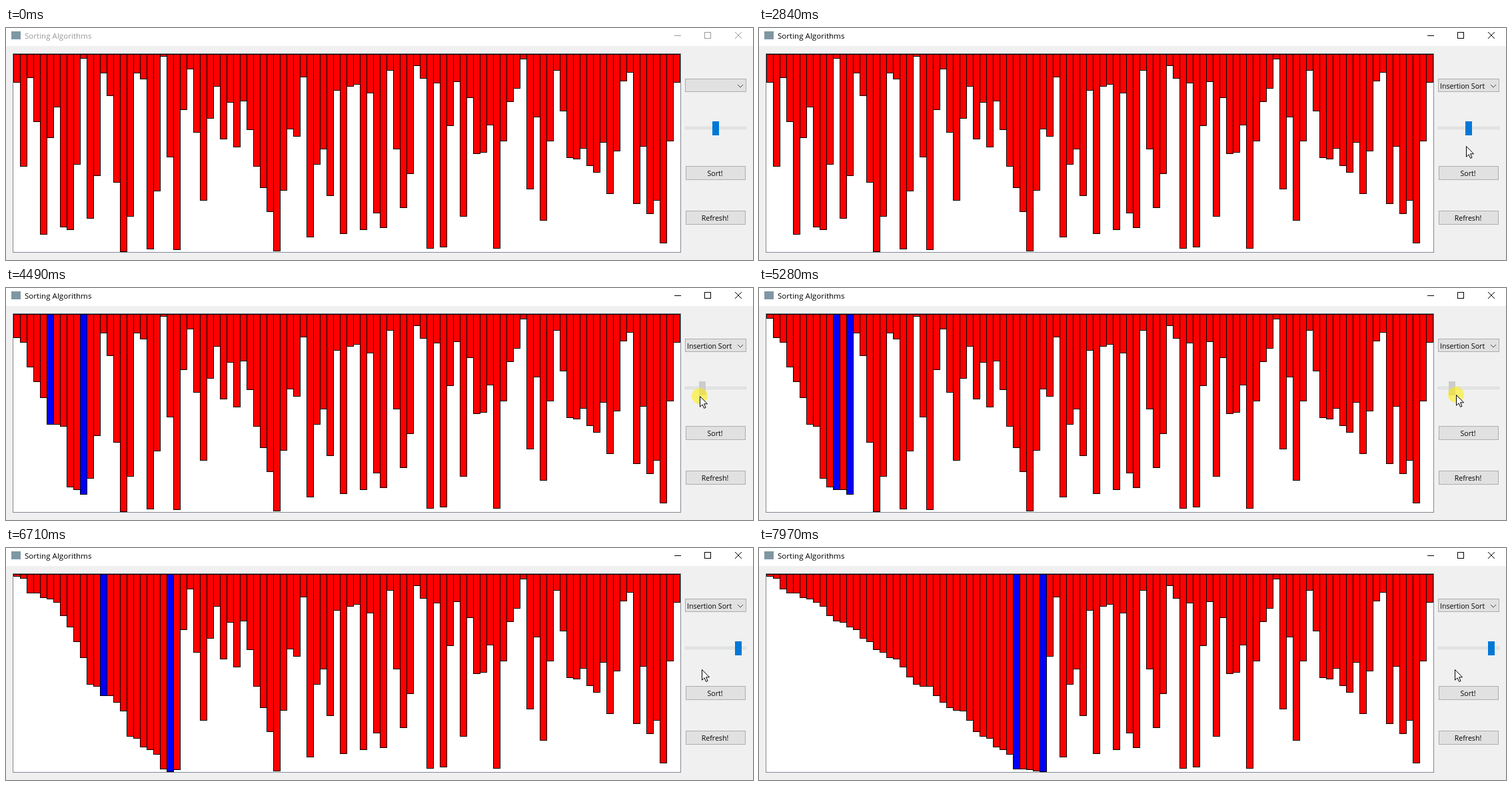
An HTML page with a canvas that plays this animation: 1121x348 px, repeating every 8 s.

```html
<!DOCTYPE html>
<html lang="en">
<head>
<meta charset="utf-8">
<title>Sorting Algorithms</title>
<style>
html, body { margin: 0; width: 100%; height: 100%; overflow: hidden; background: #f0f0f0; }
canvas, svg { position: absolute; left: 0; top: 0; width: 1121px; height: 348px; display: block; }
text { font: 500 10.6px "Open Sans", "Noto Sans", sans-serif; fill: #000; }
#title { font-size: 11.6px; }
.mid { text-anchor: middle; }
.crisp { shape-rendering: crispEdges; }
</style>
</head>
<body>
<canvas id="chart" width="1121" height="348"></canvas>
<svg viewBox="0 0 1121 348">
  <rect class="crisp" x="8" y="5" width="14" height="12" fill="#7f97a3"/>
  <text id="title" x="28" y="16">Sorting Algorithms</text>
  <g id="caption" fill="none" stroke="#000">
    <path class="crisp" d="M1003 11.5h10M1048.5 6.5h9v9h-9z"/>
    <path d="M1094 6l10 10M1104 6l-10 10"/>
  </g>
  <g class="crisp">
    <rect id="combo" x="1019.5" y="76.5" width="91" height="19"/>
    <rect x="1019.5" y="148.5" width="91" height="3" fill="#e7eaea" stroke="#d6d6d6"/>
    <rect id="handle" y="140" width="10" height="21"/>
    <rect id="sort" x="1020.5" y="207.5" width="89" height="20"/>
    <rect id="refresh" x="1020.5" y="274.5" width="89" height="20"/>
  </g>
  <path d="M1098 85l4 4 4-4" fill="none" stroke="#444"/>
  <text id="choice" x="1022" y="91">Insertion Sort</text>
  <text class="mid" x="1064" y="222">Sort!</text>
  <text class="mid" x="1064" y="289">Refresh!</text>
  <g id="popup">
    <path class="crisp" d="M1024 149h87v-48h2v50h-89z" fill="#000" opacity=".45"/>
    <path class="crisp" d="M1023 151h91v-51h-1v50h-90z" fill="#000" opacity=".15"/>
    <rect class="crisp" x="1019.5" y="96.5" width="91" height="52" fill="#fff" stroke="#555"/>
    <rect id="row" class="crisp" x="1020.5" width="89" height="12" fill="#0078d7" stroke="#ff8728" stroke-dasharray="1 1"/>
    <text class="item" x="1022" y="120">Bubble Sort</text>
    <text class="item" x="1022" y="133">Insertion Sort</text>
    <text class="item" x="1022" y="146">Merge Sort</text>
  </g>
  <g id="pointer">
    <circle id="press" r="12" fill="#ffee00" opacity=".55"/>
    <path d="M.5 .5V16.2L4.1 12.8 6.6 18.4 9 17.4 6.6 11.8H11.5Z" fill="#fff" stroke="#000"/>
  </g>
</svg>
<script>
const LOOP = 8000, LEAD = 100, TICK = 78.2;

// moments of the session, in ticks
const OPEN = 12, PICK = 30, START = 40, GRAB = 53, DROP = 79;

// [tick, x, y]
const path = [
  [0, 1068, 318], [10, 1062, 86], [13, 1062, 86], [20, 1060, 121], [21, 1060, 121],
  [23, 1060, 129], [PICK, 1060, 130], [START, 1062, 223], [42, 1062, 222], [46, 1067, 179],
  [GRAB, 1061, 153], [56, 1041, 162], [63, 1036, 161], [74, 1074, 157], [DROP, 1109, 158],
  [84, 1044, 182]
];
// [tick, shifts done]
const pace = [[41, 0], [46, 5], [56, 20], [74, 38], [78, 42], [92, 257], [100, 382]];

const $ = id => document.getElementById(id);
const ctx = $('chart').getContext('2d');
const items = document.querySelectorAll('.item');

// 15-bit linear congruential generator
let seed = 1;
function rand() {
  seed = (Math.imul(seed, 214013) + 2531011) | 0;
  return (seed >>> 16) & 0x7fff;
}
const bars = Array.from({ length: 100 }, () => 40 + rand() % 300);

function at(keys, n, col = 1) {
  const k = keys.findIndex(key => key[0] >= n);
  if (k < 1) return keys[k ? keys.length - 1 : 0][col];
  const a = keys[k - 1], b = keys[k];
  return Math.round(a[col] + (b[col] - a[col]) * (n - a[0]) / (b[0] - a[0]));
}

// insertion sort, stopped after a number of shifts
function sortTo(steps) {
  const a = bars.slice();
  for (let i = 1; steps > 0 && i < a.length; i++) {
    const key = a[i];
    let j = i - 1;
    for (; j >= 0 && a[j] > key; j--) {
      a[j + 1] = a[j];
      if (--steps === 0) return { a, i, j };
    }
    a[j + 1] = key;
  }
  return { a, i: -1, j: -1 };
}

function box(color, x, y, w, h) {
  ctx.fillStyle = color;
  ctx.fillRect(x, y, w, h);
}

function drawChart(n) {
  const { a, i, j } = sortTo(at(pace, n));
  box('#f0f0f0', 0, 0, 1121, 348);
  box('#fff', 0, 0, 1121, 27);
  box('#828790', 10, 38, 1003, 299);
  box('#fff', 11, 39, 1001, 297);
  a.forEach((b, k) => {
    const x = 11 + 10 * k;
    box('#000', x, 39, 11, b - 38);
    box(k === i || k === j ? '#00f' : '#f00', x + 1, 40, 9, b - 40);
  });
}

const mix = (a, b, p) => `rgb(${a.map((v, k) => Math.round(v + (b[k] - v) * p))})`;

// hover light that fades out after the pointer leaves
function glow(n, top, bottom) {
  for (let d = 0; d < 6 && d <= n; d++) {
    const y = at(path, n - d, 2);
    if (y >= top && y < bottom) return 1 - d / 6;
  }
  return 0;
}

function paint(id, p, down) {
  $(id).setAttribute('fill', down ? '#cce4f7' : mix([225, 225, 225], [229, 241, 251], p));
  $(id).setAttribute('stroke', down ? '#005499' : mix([173, 173, 173], [0, 120, 215], p));
}

const show = (id, on) => $(id).setAttribute('visibility', on ? 'visible' : 'hidden');

function draw(n) {
  drawChart(n);
  const x = at(path, n, 1), y = at(path, n, 2);
  const within = (from, to) => n >= from && n <= to;
  const drag = within(GRAB, DROP), starting = within(START, START + 1);

  const ink = n >= OPEN ? '#000' : '#999';
  $('title').style.fill = ink;
  $('caption').setAttribute('stroke', ink);
  paint('combo', glow(n, 76, 96), within(OPEN, PICK));
  paint('sort', glow(n, 207, 228), starting);
  paint('refresh', glow(n, 274, 295), false);

  // the handle trails the pointer by one tick
  const held = at(path, Math.min(n, DROP) - 1) - 8;
  $('handle').setAttribute('x', n < GRAB ? 1060 : Math.min(1100, held));
  $('handle').setAttribute('fill', drag ? '#ccc' : '#0078d7');

  show('choice', n > PICK);
  show('popup', within(OPEN + 1, PICK));
  const row = Math.max(0, Math.floor((y - 96) / 13));
  $('row').setAttribute('y', 96.5 + 13 * row);
  items.forEach((t, k) => t.style.fill = k + 1 === row ? '#fff' : '#000');

  show('pointer', n >= 0);
  $('pointer').setAttribute('transform', `translate(${x} ${y})`);
  const pressed = within(OPEN, OPEN + 1) || n === PICK || starting || drag;
  $('press').setAttribute('opacity', pressed ? .55 : 0);
}

const start = performance.now();
let last = null;
function loop() {
  const t = (performance.now() - start) % LOOP;
  const n = Math.floor((t - LEAD) / TICK);
  if (n !== last) draw(last = n);
  requestAnimationFrame(loop);
}
loop();
</script>
</body>
</html>
```
